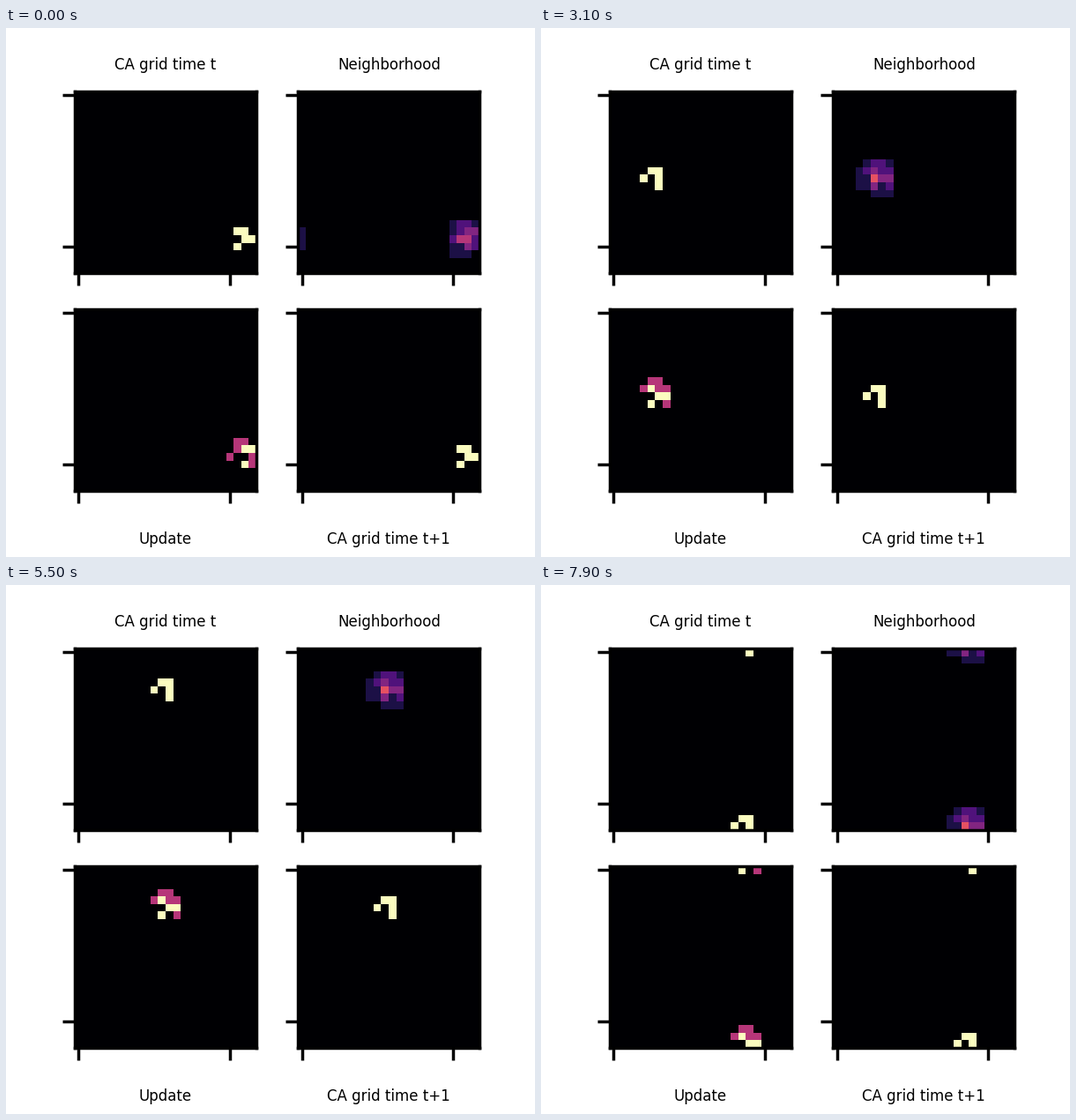
A matplotlib script that plays this animation: 600 px wide and 600 px high, repeating every 8 s.

```python
import numpy as np
import matplotlib.pyplot as plt
from matplotlib.animation import FuncAnimation

SIZE = 24
FRAMES = 80
GLIDER = [(18, 21), (18, 22), (19, 22), (19, 23), (20, 21)]

plt.rcParams["font.family"] = "DejaVu Sans"


def count_neighbors(grid):
    """Live neighbours of every cell on a wrapped grid."""
    return sum(
        np.roll(grid, (dy, dx), axis=(0, 1))
        for dy in (-1, 0, 1)
        for dx in (-1, 0, 1)
        if (dy, dx) != (0, 0)
    )


def life_step(grid):
    n = count_neighbors(grid)
    return ((n == 3) | ((n == 2) & (grid == 1))).astype(int)


def run(steps):
    grid = np.zeros((SIZE, SIZE), dtype=int)
    for cell in GLIDER:
        grid[cell] = 1
    history = [grid]
    for _ in range(steps - 1):
        history.append(life_step(history[-1]))
    return history


def make_panel(ax, title, title_y, vmax):
    ax.set_title(title, fontsize=12, y=title_y, pad=6)
    ax.set_xticks([0, 20], labels=[])
    ax.set_yticks([0, 20], labels=[])
    ax.tick_params(length=10, width=2.5)
    for spine in ax.spines.values():
        spine.set_linewidth(2.5)
    return ax.imshow(np.zeros((SIZE, SIZE)), cmap="magma", vmin=0, vmax=vmax,
                     interpolation="nearest")


history = run(FRAMES)

fig, axes = plt.subplots(2, 2, figsize=(6, 6), dpi=100)
fig.subplots_adjust(left=0.125, right=0.9, bottom=0.125, top=0.88,
                    wspace=0.2, hspace=0.2)

TOP, BOTTOM = 1.08, -0.33
now = make_panel(axes[0, 0], "CA grid time t", TOP, 1)
neighborhood = make_panel(axes[0, 1], "Neighborhood", TOP, 8)
update = make_panel(axes[1, 0], "Update", BOTTOM, 1)
after = make_panel(axes[1, 1], "CA grid time t+1", BOTTOM, 1)


def draw(frame):
    grid = history[frame]
    n = count_neighbors(grid)
    now.set_data(grid)
    neighborhood.set_data(n)
    # 3 neighbours: birth or survival, 2 neighbours: survival only
    update.set_data((n == 3) + 0.5 * (n == 2))
    after.set_data(grid)
    return now, neighborhood, update, after


anim = FuncAnimation(fig, draw, frames=FRAMES, interval=100, repeat=True,
                     repeat_delay=0)
plt.show()
```
